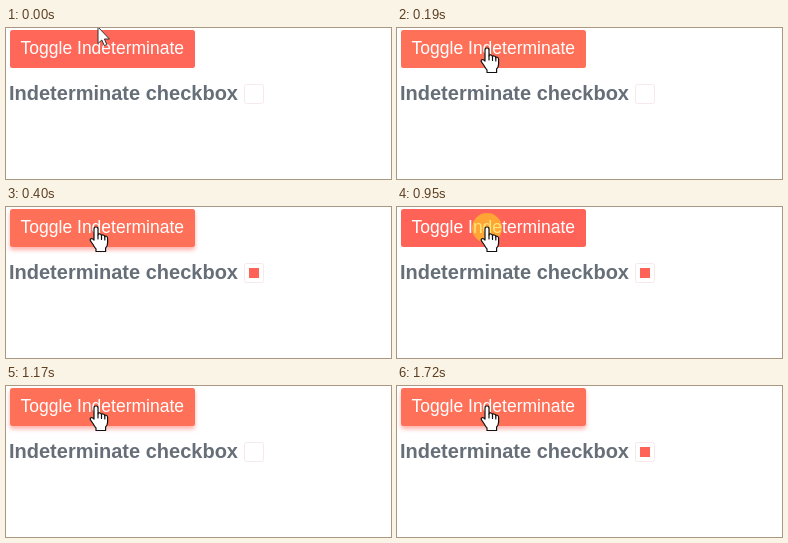
An HTML page for the animation above (2.15 s loop, 385 by 151 pixels).

```html
<!DOCTYPE html>
<html lang="en">
<head>
<meta charset="utf-8">
<title>Indeterminate checkbox</title>
<style>
  html, body { margin: 0; width: 100%; height: 100%; overflow: hidden; background: #fff; }
  svg { display: block; width: 385px; height: 151px; }
  text { font-family: "Liberation Sans", Arial, sans-serif; }
</style>
</head>
<body>
<svg viewBox="0 0 385 151">
  <rect id="button" x="4" y="2" width="185" height="38" rx="2.5"/>
  <text x="14.6" y="26" font-size="17.5" fill="#fff">Toggle Indeterminate</text>
  <text x="3" y="72" font-size="20" font-weight="700" fill="#666e78">Indeterminate checkbox</text>
  <rect x="238.5" y="56.5" width="19" height="19" rx="2" fill="#fff" stroke="#f7e8ea"/>
  <rect id="mark" x="243" y="61" width="10" height="10" fill="#ff6358"/>
  <circle id="press" cx="90" cy="21" r="15" fill="#ffd21e" opacity=".6"/>
  <path id="arrow" d="M92 -1V15.5L95.8 12L98.3 17.6L100.8 16.5L98.4 11H103.4Z"
        fill="#fff" stroke="#333" stroke-linejoin="round"/>
  <g id="hand" stroke="#111" stroke-width="1.2" stroke-linejoin="round" stroke-linecap="round">
    <path fill="#fff" d="M-2 13V2Q-2 0 0 0T2 2V8Q2 6.8 3.8 7T5.5 9Q5.6 7.7 7.2 8T8.8 10
      Q9 8.9 10.3 9.3T11.6 11.5V16Q11.6 19 9.6 21V24.5H0V22Q-1.5 20.5 -3 17.5L-5.4 14.2
      Q-6.4 12.4 -5 11.8T-2 13Z"/>
    <path fill="none" d="M2 8V12M5.5 9V12.5M8.8 10V13"/>
  </g>
</svg>
<script>
const LOOP = 2150;
const RED = "#ff6358", HOVER = "#ff7058";
const el = id => document.getElementById(id);
const button = el("button"), mark = el("mark"), press = el("press");
const arrow = el("arrow"), hand = el("hand");

// Each state holds until the next start time.
const states = [
  { at: 0, color: "#ff6759", arrow: true },
  { at: 100, color: "#ff6b58", y: 15 },
  { at: 190, color: HOVER },
  { at: 300, color: RED, press: true },
  { at: 400, color: HOVER, shadow: 0.5, mark: true },
  { at: 950, color: RED, press: true, mark: true },
  { at: 1070, color: "#ff6b58", shadow: 0.3 },
  { at: 1170, color: HOVER, shadow: 0.5 },
  { at: 1620, color: RED, press: true },
  { at: 1720, color: HOVER, shadow: 0.5, mark: true }
];

function show(node, on) {
  node.style.display = on ? "" : "none";
}

function render(time) {
  const t = time % LOOP;
  const s = states.filter(state => state.at <= t).pop();
  button.setAttribute("fill", s.color);
  button.style.filter = s.shadow ? `drop-shadow(0 3px 2px rgba(255,99,88,${s.shadow}))` : "none";
  show(mark, s.mark);
  show(press, s.press);
  show(arrow, s.arrow);
  show(hand, !s.arrow);
  hand.setAttribute("transform", `translate(90 ${s.y ?? 20})`);
}

const start = performance.now();
function tick() {
  render(performance.now() - start);
  requestAnimationFrame(tick);
}
tick();
</script>
</body>
</html>
```
